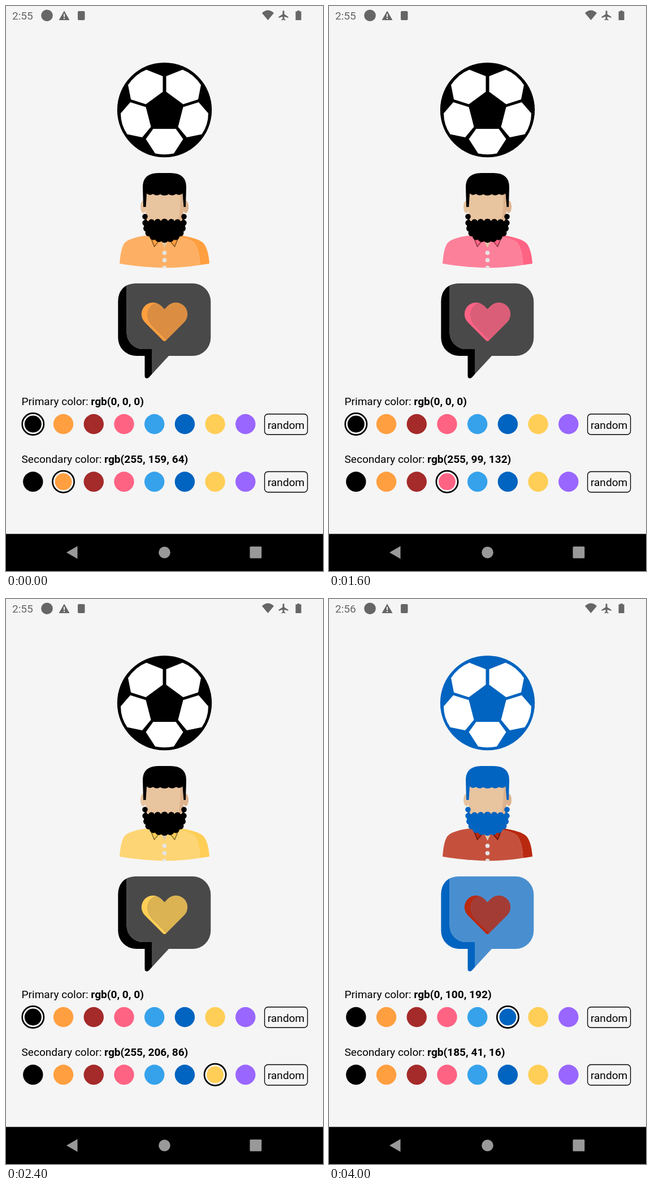
Animation of 561x998 px, one loop 4.8 s. Source, as an HTML page:

```html
<!DOCTYPE html>
<html lang="en">
<head>
<meta charset="utf-8">
<title>Icon colours</title>
<style>
  html, body { margin: 0; height: 100%; overflow: hidden; background: #f5f5f5; }
  svg { display: block; width: 561px; height: 998px; font: 19.09px Roboto, sans-serif; }
  .p { fill: var(--p); }
  .s { fill: var(--s); }
  .bold { font-weight: 700; }
  .ring { fill: #fff; stroke: #000; stroke-width: 2.73; }
</style>
</head>
<body>
<svg id="stage" viewBox="0 0 561 998">
  <!-- status bar -->
  <g fill="#666">
    <text id="clock" x="11" y="24"></text>
    <circle cx="72.5" cy="16.7" r="10.3"/>
    <path fill-rule="evenodd" d="M103 8.5L112.5 25H93.5ZM102 14V19.5H104V14ZM102 21V23H104V21Z"/>
    <rect x="127" y="9" width="12.5" height="16" rx="2"/>
    <path d="M453 12.5Q463.500 2.500 474 12.500L463.500 25Z"/>
    <path d="M491 8Q492.500 8 492.500 10V14.500L499.500 19V21L492.500 18.700V22.800L494.500 24.200V25.500L491 24.500L487.500 25.500V24.200L489.500 22.800V18.700L482.500 21V19L489.500 14.500V10Q489.500 8 491 8Z"/>
    <path d="M513 9.500H515.500V8H519.500V9.500H522.500V25H512.500V9.500Z"/>
  </g>

  <!-- football -->
  <circle class="p" cx="280.5" cy="183.6" r="83.7"/>
  <g id="patches" fill="#fff">
    <g id="side">
      <path d="M216 139.500Q229 120 248.500 112.500L277.500 124V151.500L247.500 173.500L221 165Z"/>
      <path d="M220 170L247.500 178.500L256.500 213.500L241 232L214.500 226.500Q203 210 203 189.500Z"/>
    </g>
    <use href="#side" transform="matrix(-1 0 0 1 561 0)"/>
    <path d="M260.500 217H300.500L313.500 235L297 260.500Q280.500 264 264 260.500L247.500 235Z"/>
  </g>

  <!-- bearded man -->
  <path class="s" opacity=".8" d="M201 455Q203 427 210 418.500Q218 409 252 405H302Q324 408 333 418Q342 430 343.500 457.500Q312 462.500 280.500 462.500Q234 461 201 455Z"/>
  <path class="s" d="M302 405H308Q340 410 349 418.500Q358 428 360 455L343.500 457.500Q342 430 333 418Q324 409 302 407Z"/>
  <path fill="#e0c9a8" d="M274 413H287L280.500 427Z"/>
  <g id="collar">
    <path class="s" d="M254 406L262.500 426L275 413Z"/>
    <path d="M256 409L262.500 425L270 415.500" fill="none" stroke="#000" stroke-opacity=".6" stroke-width="1.2"/>
  </g>
  <use href="#collar" transform="matrix(-1 0 0 1 561 0)"/>
  <g fill="#e5e5e5">
    <circle cx="280.5" cy="436" r="3.8"/>
    <circle cx="280.5" cy="449" r="3.8"/>
    <path d="M276.700 462.500A3.800 3.800 0 0 1 284.300 462.500Z"/>
  </g>
  <ellipse cx="243" cy="355" rx="5" ry="11" fill="#e8c49f"/>
  <ellipse cx="318" cy="355" rx="5" ry="11" fill="#ddb38d"/>
  <path fill="#e8c49f" d="M247 325H314V385H247Z"/>
  <path fill="#ddb38d" d="M309 328H314V382H304Q309 368 309 328Z"/>
  <path class="p" d="M243 355L242 320Q242 295 270 295H291Q319 295 319 320L318 355H314.500L312.500 331Q307 336 301 332Q295 336.500 288 332.500Q280.500 337 273 332.500Q266 336.500 260 332Q254 336 249 331L247.500 355Z"/>
  <g id="beard" class="p">
    <path d="M246 370L250 380H311L315 370L317 390L306 408L280.500 416L255 408L244 390Z"/>
  </g>

  <!-- speech bubble -->
  <path class="p" d="M213.500 493.500V577A29 29 0 0 0 242 606H258V650.500L253.500 655.500Q250 659 247 657Q245.500 656 245.500 653V618H230A32 32 0 0 1 198.300 586V522Q198.300 502 213.500 493.500Z"/>
  <path class="p" opacity=".7" d="M213.500 493.500Q221 490 230 490H330A32 32 0 0 1 362.300 522V586A32 32 0 0 1 330 618H288L258 650.500V606H242A29 29 0 0 1 213.500 577Z"/>
  <path class="s" d="M266 524.600A20.500 20.500 0 0 0 246 559L278 591Q280.500 593 283 591L284 590L257 563Q251 556 250.500 545Q251 530 266 524.600Z"/>
  <path class="s" opacity=".8" d="M266 524.600Q270.500 526 274.600 529.500L280.500 535.500L286.400 529.500A20.500 20.500 0 0 1 315 559L284 590L257 563Q251 556 250.500 545Q251 530 266 524.600Z"/>

  <!-- colour pickers -->
  <text x="27.5" y="705">Primary color: <tspan id="primary" class="bold"></tspan></text>
  <text x="27.5" y="807">Secondary color: <tspan id="secondary" class="bold"></tspan></text>
  <g id="pickers"></g>

  <!-- navigation bar -->
  <path d="M0 932.500H561V998H0Z"/>
  <g fill="#999">
    <path d="M107 965.200L126.500 954V976.500Z"/>
    <circle cx="280.5" cy="965.2" r="10.3"/>
    <rect x="431.500" y="954.800" width="20.800" height="20.800" rx="1.500"/>
  </g>
</svg>
<script>
const BLACK = 'rgb(0, 0, 0)', ORANGE = 'rgb(255, 159, 64)', BROWN = 'brown',
  PINK = 'rgb(255, 99, 132)', SKY = 'rgb(54, 162, 235)', BLUE = 'rgb(0, 100, 192)',
  YELLOW = 'rgb(255, 206, 86)', PURPLE = 'rgb(153, 102, 255)', RED = 'rgb(185, 41, 16)';
const palette = [BLACK, ORANGE, BROWN, PINK, SKY, BLUE, YELLOW, PURPLE];
const steps = [
  [BLACK, ORANGE], [BLACK, BROWN], [BLACK, PINK],
  [BLACK, YELLOW], [BLUE, YELLOW], [BLUE, RED],
];
const STEP_MS = 800;
const byId = id => document.getElementById(id);
const stage = byId('stage');
const circle = (x, y, r, rest = '') => `<circle cx="${x}" cy="${y}" r="${r}" ${rest}/>`;

// Curls: x offset from the middle, y, radius; mirrored on both sides
const curls = [[34.5, 372, 4.8], [34, 383, 5.2], [32, 393, 5.5], [28, 401, 6],
  [20, 407, 6.5], [10, 410, 7], [0, 411, 7.2], [0, 382, 6.2], [12, 382, 6], [23, 382, 5.5]];
byId('beard').innerHTML += curls.map(([dx, y, r]) =>
  circle(280.5 - dx, y, r) + circle(280.5 + dx, y, r)).join('');

function picker(selected, y) {
  const dots = palette.map((color, i) => {
    const x = 47.8 + 53.72 * i, on = color === selected;
    return (on ? circle(x, y, 19.1, 'class="ring"') : '') +
      circle(x, y, on ? 15 : 17.7, `fill="${color}"`);
  });
  return dots.join('') +
    `<rect x="457.600" y="${y - 17.8}" width="76" height="36.300" rx="6" fill="none" stroke="#000" stroke-width="1.360"/>
     <text x="495.600" y="${y + 8}" text-anchor="middle">random</text>`;
}

let shown = -1;
function draw(now) {
  const step = Math.floor(now / STEP_MS) % steps.length;
  if (step !== shown) {
    shown = step;
    const [primary, secondary] = steps[step];
    stage.style.setProperty('--p', primary);
    stage.style.setProperty('--s', secondary);
    byId('primary').textContent = primary;
    byId('secondary').textContent = secondary;
    byId('clock').textContent = step === steps.length - 1 ? '2:56' : '2:55';
    byId('pickers').innerHTML = picker(primary, 738.5) + picker(secondary, 840.3);
  }
  requestAnimationFrame(() => draw(performance.now()));
}
draw(performance.now());
</script>
</body>
</html>
```
